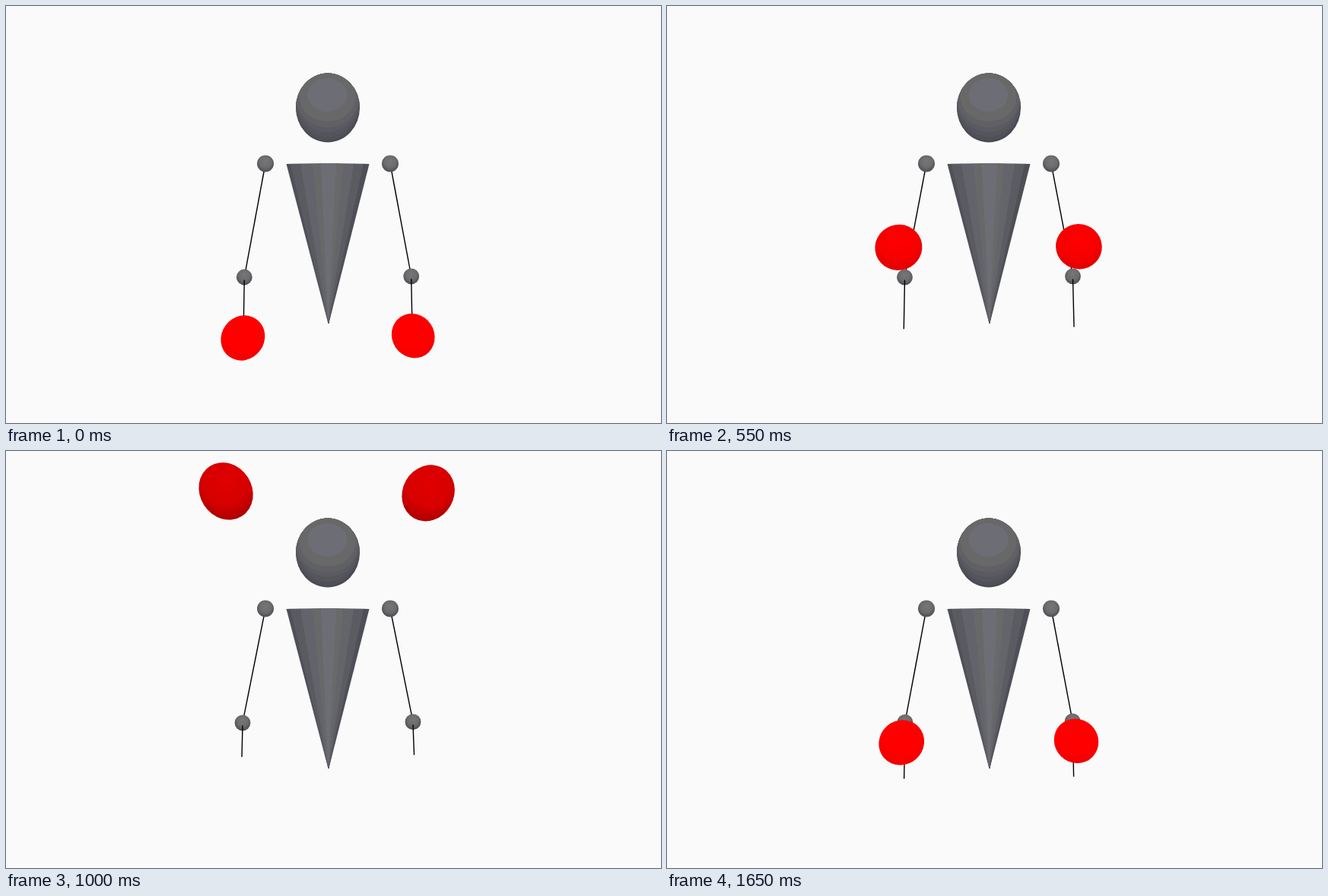
An HTML page with a canvas that plays this animation: 861x549 px, repeating every 1.7 s.

```html
<!DOCTYPE html>
<html lang="en">
<head>
<meta charset="utf-8">
<title>Juggler</title>
<style>
html, body { margin: 0; width: 100%; height: 100%; overflow: hidden; background: #fafafa; }
canvas { display: block; }
</style>
</head>
<body>
<canvas id="stage" width="861" height="549"></canvas>
<script>
const ctx = document.getElementById('stage').getContext('2d');
const LOOP = 1700, STEP = 50, HOLD = 434, APEX = 1067;
const CENTER = { x: 430.5, y: 274.5 }, FOCAL = 475;

function ellipse(x, y, rx, ry, fill, angle = 0) {
  ctx.beginPath();
  ctx.ellipse(x, y, rx, ry, angle, 0, Math.PI * 2);
  ctx.fillStyle = fill;
  ctx.fill();
}

function line(x1, y1, x2, y2) {
  ctx.beginPath();
  ctx.moveTo(x1, y1);
  ctx.lineTo(x2, y2);
  ctx.strokeStyle = '#000';
  ctx.lineWidth = 1.4;
  ctx.stroke();
}

function joint(x, y, r) {
  const g = ctx.createRadialGradient(x, y - r * 0.3, 0, x, y - r * 0.15, r * 1.15);
  g.addColorStop(0, '#777778');
  g.addColorStop(0.6, '#6c6c6e');
  g.addColorStop(1, '#4c4c52');
  ellipse(x, y, r, r, g);
}

function head() {
  ctx.save();
  ctx.beginPath();
  ctx.ellipse(423, 134, 42, 45.5, 0, 0, Math.PI * 2);
  ctx.clip();
  ctx.fillStyle = '#4a4a53';
  ctx.fillRect(380, 88, 86, 92);
  // Each band: bottom edge, horizontal radius, colour.
  const bands = [
    [177, 43, '#505059'], [172, 43, '#55555d'], [166, 42, '#5a5a62'],
    [160, 41, '#606065'], [152, 37, '#686869'], [139, 26, '#6d6d76']
  ];
  for (const [bottom, rx, color] of bands) {
    const top = 95 - (bottom - 139) * 0.6;
    ellipse(422.5, (top + bottom) / 2, rx, (bottom - top) / 2, color);
  }
  ctx.restore();
}

function cone() {
  const edges = [368.5, 374, 387, 403, 414, 434, 443, 457, 470, 477.5];
  const colors = ['#505059', '#5a5a61', '#63636b', '#686869', '#6d6d75',
                  '#69696a', '#64646b', '#5b5b62', '#4f4f58'];
  const topY = x => 207 + ((x - 423) / 54) ** 2;
  colors.forEach((color, i) => {
    const a = edges[i], b = edges[i + 1] + (i < 8 ? 0.6 : 0);
    ctx.beginPath();
    ctx.moveTo(a, topY(a));
    ctx.lineTo(b, topY(b));
    ctx.lineTo(424.3, 418);
    ctx.lineTo(423.5, 418);
    ctx.fillStyle = color;
    ctx.fill();
  });
}

// A sphere under perspective stretches away from the view centre.
function ball(x, y, r) {
  const dx = x - CENTER.x, dy = y - CENTER.y;
  const stretch = Math.sqrt(1 + (dx * dx + dy * dy) / FOCAL ** 2);
  const light = Math.min(255, 209 + 0.12 * y);
  const red = k => `rgb(${Math.round(Math.min(255, light * k))},0,0)`;
  const lit = Math.min(1, Math.max(0, (y - 180) / 220));
  const g = ctx.createRadialGradient(x, y - r * 0.4, 0, x, y - r * 0.25, r * 1.4);
  g.addColorStop(0, red(1.04));
  g.addColorStop(0.6, red(1));
  g.addColorStop(1, red(0.78 + 0.16 * lit));
  ellipse(x, y, r * stretch, r, g, Math.atan2(dy, dx));
}

function ballHeight(t) {
  if (t < HOLD) return 437 + 83 * Math.sin(Math.PI * t / HOLD);
  const d2 = (t - APEX) ** 2;
  return 48 + 0.00109 * d2 - 3e-10 * d2 * d2;
}

function handHeight(t) {
  return t < HOLD ? ballHeight(t) : 402.5 + 8.5e-5 * (t - APEX) ** 2;
}

function arm(shoulderX, elbowX, elbowY, handX, handY) {
  line(shoulderX, 207.5, elbowX, elbowY);
  joint(shoulderX, 207.5, 11);
  joint(elbowX, elbowY, 10.4);
  line(elbowX, elbowY + 3.5, handX, handY);
}

function draw(t) {
  ctx.fillStyle = '#fafafa';
  ctx.fillRect(0, 0, 861, 549);
  head();
  cone();

  const hand = handHeight(t), reach = hand - 403;
  const elbowY = 357 + 0.0006 * (hand - 440) ** 2;
  arm(341, 311 + 0.067 * reach, elbowY, 310 + 0.058 * reach, hand);
  arm(505, 535 - 0.067 * reach, elbowY - 1.2, 536.5 - 0.067 * reach, hand - 2.6);

  const left = ballHeight(t), right = left * 0.9862 + 3.2;
  ball(286 + 0.058 * left, left, 35 - 0.0158 * left);
  ball(558 - 0.0524 * right, right, 34.5 - 0.0156 * right);
}

function tick() {
  const t = performance.now() % LOOP;
  draw(Math.floor(t / STEP) * STEP);
  requestAnimationFrame(tick);
}
tick();
</script>
</body>
</html>
```
